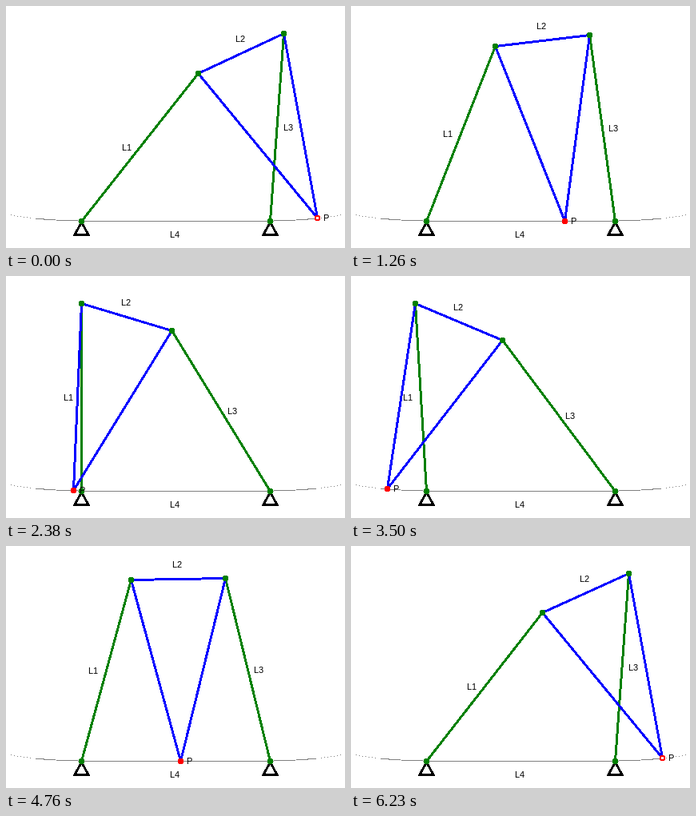
These frames come from a looping animation (424x303 px, 6.3 s). An HTML page:

```html
<!DOCTYPE html>
<html lang="en">
<head>
<meta charset="utf-8">
<title>Four-bar straight-line linkage</title>
<style>
html, body { margin: 0; width: 100%; height: 100%; overflow: hidden; background: #fff; }
svg { display: block; width: 424px; height: 303px; }
text { font: 11px "Liberation Sans", Arial, sans-serif; fill: #000; }
path, circle { shape-rendering: crispEdges; }
.thin { fill: none; stroke: #808080; stroke-width: 1; }
.bar { fill: none; stroke-width: 3; stroke-linejoin: round; stroke-linecap: round; }
.green { stroke: #008000; }
.blue { stroke: #00f; }
.support { fill: #fff; stroke: #000; stroke-width: 3; }
.joint { fill: #008000; }
</style>
</head>
<body>
<svg viewBox="0 0 424 303">
  <path class="support" d="M94.5 270.5L86 286.5H103Z"/>
  <path class="support" d="M330.5 270.5L322 286.5H339Z"/>
  <path class="thin" d="M94 269.5H330"/>
  <path class="thin" id="track"/>
  <path class="thin" id="dotsL" stroke-dasharray="1 3"/>
  <path class="thin" id="dotsR" stroke-dasharray="1 3"/>
  <path class="bar green" id="cranks"/>
  <path class="bar blue" id="coupler"/>
  <circle class="joint" cx="94.5" cy="269.5" r="3.6"/>
  <circle class="joint" cx="330.5" cy="269.5" r="3.6"/>
  <circle class="joint" id="jointC" r="3.6"/>
  <circle class="joint" id="jointD" r="3.6"/>
  <circle id="tracer" r="3.6" fill="#f00"/>
  <circle id="endL" r="1.4" fill="#fff"/>
  <circle id="endR" r="1.4" fill="#fff"/>
  <text id="L1">L1</text>
  <text id="L2">L2</text>
  <text id="L3">L3</text>
  <text x="205" y="290">L4</text>
  <text id="P">P</text>
</svg>
<script>
const STEP = 70, STEPS = 90, REACH = 1.5;
const $ = id => document.getElementById(id);
const A = [-1, 0], B = [1, 0];
const HEIGHT = Math.sqrt(3.75); // apex height of the coupler triangle

// Pose for a given angle of the left crank; ground 2, cranks 2, coupler 1.
function pose(angle) {
  const C = [A[0] + 2 * Math.cos(angle), 2 * Math.sin(angle)];
  const dx = B[0] - C[0], dy = B[1] - C[1], d = Math.hypot(dx, dy);
  const along = (d * d - 3) / (2 * d);
  const side = Math.sqrt(Math.max(0, 1 - along * along));
  const D = [C[0] + (along * dx - side * dy) / d, C[1] + (along * dy + side * dx) / d];
  const ux = D[0] - C[0], uy = D[1] - C[1];
  const P = [(C[0] + D[0]) / 2 + HEIGHT * uy, (C[1] + D[1]) / 2 - HEIGHT * ux];
  return { C, D, P };
}

// Find the pose that puts the tracer at a given x.
function solve(x) {
  let lo = Math.acos(0.75), hi = Math.acos(-0.125);
  for (let i = 0; i < 40; i++) {
    const mid = (lo + hi) / 2;
    if (pose(mid).P[0] > x) lo = mid; else hi = mid;
  }
  return pose(lo);
}

const exact = ([x, y]) => [212.5 + 118.3 * x, 269.1 - 117.5 * y];
const snap = p => exact(p).map(v => Math.floor(v) + 0.5);
const line = (...pts) => "M" + pts.map(p => p.join(" ")).join("L");

function curve(from, to) {
  const pts = [], n = 60;
  for (let i = 0; i <= n; i++) pts.push(exact(solve(from + (to - from) * i / n).P));
  return line(...pts);
}

function place(id, [x, y]) {
  $(id).setAttribute("cx", x);
  $(id).setAttribute("cy", y);
}

function label(id, [x, y], dx, dy) {
  $(id).setAttribute("x", Math.round(x + dx - 0.5));
  $(id).setAttribute("y", Math.round(y + dy + 3.5));
}

const middle = (p, q) => [(p[0] + q[0]) / 2, (p[1] + q[1]) / 2];

function draw(time) {
  const k = Math.floor(time / STEP) % STEPS;
  const now = solve(REACH * Math.cos(2 * Math.PI * k / STEPS));
  const [a, b, c, d, p] = [A, B, now.C, now.D, now.P].map(snap);
  $("cranks").setAttribute("d", line(a, c) + line(b, d));
  $("coupler").setAttribute("d", line(c, d, p) + "Z");
  place("jointC", c);
  place("jointD", d);
  place("tracer", p);
  label("L1", middle(a, c), -22, 0);
  label("L2", middle(c, d), -7, -18);
  label("L3", middle(b, d), 8, 0);
  label("P", p, 8, 0);
}

$("track").setAttribute("d", curve(-REACH, REACH));
$("dotsL").setAttribute("d", curve(-REACH, -1.76));
$("dotsR").setAttribute("d", curve(REACH, 1.76));
place("endL", snap(solve(-REACH).P));
place("endR", snap(solve(REACH).P));

function tick() {
  draw(performance.now());
  requestAnimationFrame(tick);
}
tick();
</script>
</body>
</html>
```
